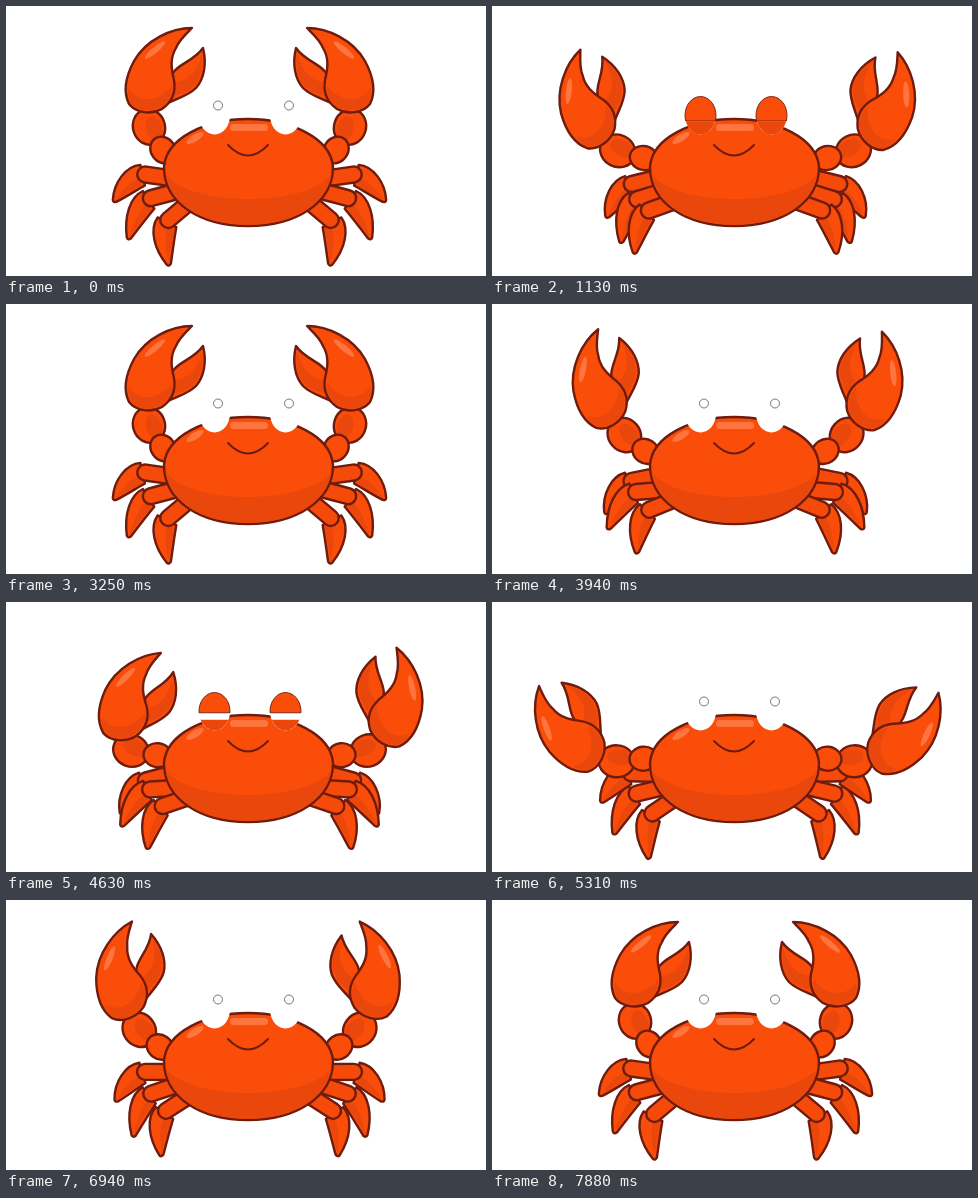
Recreate the animation shown at these times as an HTML page. Size 480 by 270 pixels, loop 7.95 s.

```html
<!DOCTYPE html>
<html lang="en">
<head>
<meta charset="utf-8">
<title>Waving crab</title>
<style>
  html, body { margin: 0; width: 100%; height: 100%; overflow: hidden; background: #fff; }
  svg { display: block; width: 100vw; height: 100vh; }
  .skin { fill: #fb4d0a; stroke: #6f1c0e; stroke-width: 2.4; stroke-linejoin: round; }
  .shade { fill: #e9470c; }
  .shine { fill: #ff7540; }
  .line { fill: none; stroke: #6f1c0e; stroke-width: 2; stroke-linecap: round; }
  .rim { stroke: #6f1c0e; stroke-width: 18.4; stroke-linecap: round; }
  .flesh { stroke: #f54a0a; stroke-width: 13.6; stroke-linecap: round; }
  .white { fill: #fff; }
  .glint { fill: #fff; stroke: #555; stroke-width: .8; }
  .lid { fill: #fb4d0a; stroke: #6f1c0e; stroke-width: .9; }
  .under { fill: #e9470c; }
</style>
</head>
<body>
<svg viewBox="0 0 480 270" xmlns="http://www.w3.org/2000/svg">
  <defs>
    <g id="claw">
      <path class="skin" d="M197 42C201 58 198 73 190 82C182 90 172 92 160 98L154 85Q160 75 167 67C172 58 188 55 197 42Z"/>
      <path class="shade" d="M196 48C198 62 195 73 188 80C182 86 175 88 168 90Q171 82 170 76C184 74 191 64 196 48Z"/>
      <path class="skin" d="M186 22C165 22 140 34 128 55C120 70 117 86 123 98C130 107 145 109 156 103C166 96 170 86 168 74C165 62 164 52 170 42C173 34 180 28 186 22Z"/>
      <path class="shade" d="M123 82C132 98 152 96 166 80C166 90 162 97 155 101C145 107 131 105 125 97C122 92 122 87 123 82Z"/>
      <ellipse class="shine" cx="149" cy="44" rx="13" ry="3" transform="rotate(-40 149 44)"/>
    </g>
  </defs>
  <g id="left"></g>
  <g id="right" transform="translate(487) scale(-1 1)"></g>
  <path class="skin" d="M158 161C160 132 200 113 242 113S325 132 327 161C327 197 290 220 242 220S158 197 158 161Z"/>
  <path class="shade" d="M159.500 168C172 185 208 193 242 193S313 185 325.500 168C321 198 288 219 242 219S164 198 159.500 168Z"/>
  <rect class="shine" x="224" y="118" width="38" height="7" rx="3.500"/>
  <ellipse class="shine" cx="189" cy="132" rx="10" ry="3.500" transform="rotate(-32 189 132)"/>
  <path class="line" d="M222 139Q242 160 262 139"/>
  <g id="eyes"></g>
</svg>
<script>
const LOOP = 7950, STEP = 62.5;
const NS = "http://www.w3.org/2000/svg";
const { sin, cos, sqrt, abs, min, max, floor, PI } = Math;
const $ = id => document.getElementById(id);
const clamp = x => min(1, max(0, x));

function add(parent, tag, attrs = {}) {
  const el = document.createElementNS(NS, tag);
  for (const k in attrs) el.setAttribute(k, attrs[k]);
  return parent.appendChild(el);
}
const spin = (el, deg, [x, y] = [0, 0]) => el.setAttribute("transform", `rotate(${deg} ${x} ${y})`);

// Cosine easing from one [time, value] point to the next.
function glide(points, t) {
  let i = 0;
  while (i < points.length - 2 && t >= points[i + 1][0]) i++;
  const [[t0, a], [t1, b]] = points.slice(i, i + 2);
  return a + (b - a) * (1 - cos(PI * clamp((t - t0) / (t1 - t0)))) / 2;
}

// The crab waves twice; the middle legs step the other way the second time.
const waves = [
  { from: 60, to: 3250, size: 0.95, dir: -1 },
  { from: 3310, to: 7370, size: 1.1, dir: 1 }
];
const clawTurn = {
  left: [[60, 0], [1990, -75], [3250, 0], [4090, -42], [4630, -4], [5750, -102], [6150, -100], [7370, 0]],
  right: [[60, 0], [1850, -74], [3250, 0], [4300, -60], [4700, -36], [5800, -102], [6050, -98], [7370, 0]]
};
const blinks = [1140, 4732];

// Thigh and shin are [angle at rest, change when tucked, change with the step],
// measured outwards from straight down.
const legs = [
  { hip: [164, 172], length: [28, 40], thigh: [98, -26, 0], shin: [46, -14, 0] },
  { hip: [168, 186], length: [27, 45], thigh: [75, 5, 8], shin: [26, 0, 10] },
  { hip: [186, 194], length: [34, 44], thigh: [50, 24, 0], shin: [-4, 23, 0] }
];
const shoulder = [165, 155], elbow = [149, 133], wrist = [142, 112];

function makeLeg(parent, { hip, length: [l1, l2], thigh, shin }) {
  const upper = add(add(parent, "g", { transform: `translate(${hip})` }), "g");
  const lower = add(add(upper, "g", { transform: `translate(0 ${l1})` }), "g");
  add(lower, "path", { class: "skin", d: `M-8 -5C-17 6 -14 26 -2 ${l2 - 1}Q0 ${l2 + 1} 2 ${l2 - 2}C5 28 7 18 10 6Z` });
  add(lower, "path", { class: "shade", d: `M8 7C5 18 3 26 0 ${l2 - 3}Q-4 20 0 7Z` });
  for (const c of ["rim", "flesh"]) add(upper, "line", { class: c, y2: l1 - 3 });
  return (tuck, step) => {
    const [a, b] = [thigh, shin].map(([rest, k, m]) => rest + k * tuck + m * step);
    spin(upper, a);
    spin(lower, b - a);
  };
}

function makeArm(parent) {
  const arm = add(parent, "g"), fore = add(arm, "g");
  add(fore, "ellipse", { class: "skin", cx: 143, cy: 121, rx: 16, ry: 18, transform: "rotate(-18 143 121)" });
  add(fore, "ellipse", { class: "shade", cx: 148, cy: 123, rx: 8, ry: 13, transform: "rotate(-18 148 123)" });
  const claw = add(fore, "g");
  add(claw, "use", { href: "#claw" });
  add(arm, "ellipse", { class: "skin", cx: 157, cy: 144, rx: 12, ry: 14, transform: "rotate(-36 157 144)" });
  return (reach, turn) => {
    const a = -56 * reach, b = -62 * reach;
    spin(arm, a, shoulder);
    spin(fore, b - a, elbow);
    spin(claw, turn - b, wrist);
  };
}

function makeEye(cx) {
  const cy = 109.5, rx = 15.5, ry = 19, g = $("eyes");
  add(g, "ellipse", { class: "white", cx, cy, rx, ry });
  add(g, "circle", { class: "glint", cx: cx + 3.5, cy: 99.5, r: 4.5 });
  const under = add(g, "path", { class: "under" }), lid = add(g, "path", { class: "lid" });
  // Part of the eye above (sweep 1) or below (sweep 0) the level y.
  const cap = (y, sweep) => {
    const w = rx * sqrt(max(0, 1 - ((y - cy) / ry) ** 2));
    const large = +((y > cy) === (sweep === 1));
    return `M${cx - w} ${y}A${rx} ${ry} 0 ${large} ${sweep} ${cx + w} ${y}Z`;
  };
  return k => {
    lid.setAttribute("d", k ? cap(90.5 + 24.5 * k, 1) : "");
    under.setAttribute("d", k ? cap(128.5 - 13 * k, 0) : "");
  };
}

const sides = ["left", "right"].map(id => ({
  turn: clawTurn[id],
  legs: legs.map(leg => makeLeg($(id), leg)),
  arm: makeArm($(id))
}));
const eyes = [208.5, 279.5].map(makeEye);

function draw(t) {
  const { from, to, size, dir } = waves.find(w => t < w.to) || waves[1];
  const u = clamp((t - from) / (to - from));
  const reach = size * max(0, sin(PI * u ** 1.1)) ** 1.2;
  const swing = sin(2 * PI * u);
  const tuck = (1.2 - 0.5 * u) * (0.8 * swing ** 2 + 0.25 * sin(PI * u));
  for (const { turn, legs, arm } of sides) {
    arm(reach, glide(turn, t));
    legs.forEach(pose => pose(tuck, dir * swing));
  }
  const blink = max(...blinks.map(mid => clamp(1.8 - abs(t - mid) / 110)));
  eyes.forEach(eye => eye(blink));
}

const start = performance.now();
function tick() {
  const t = (performance.now() - start) % LOOP;
  draw(floor(t / STEP + 0.1) * STEP);
  requestAnimationFrame(tick);
}
tick();
</script>
</body>
</html>
```
